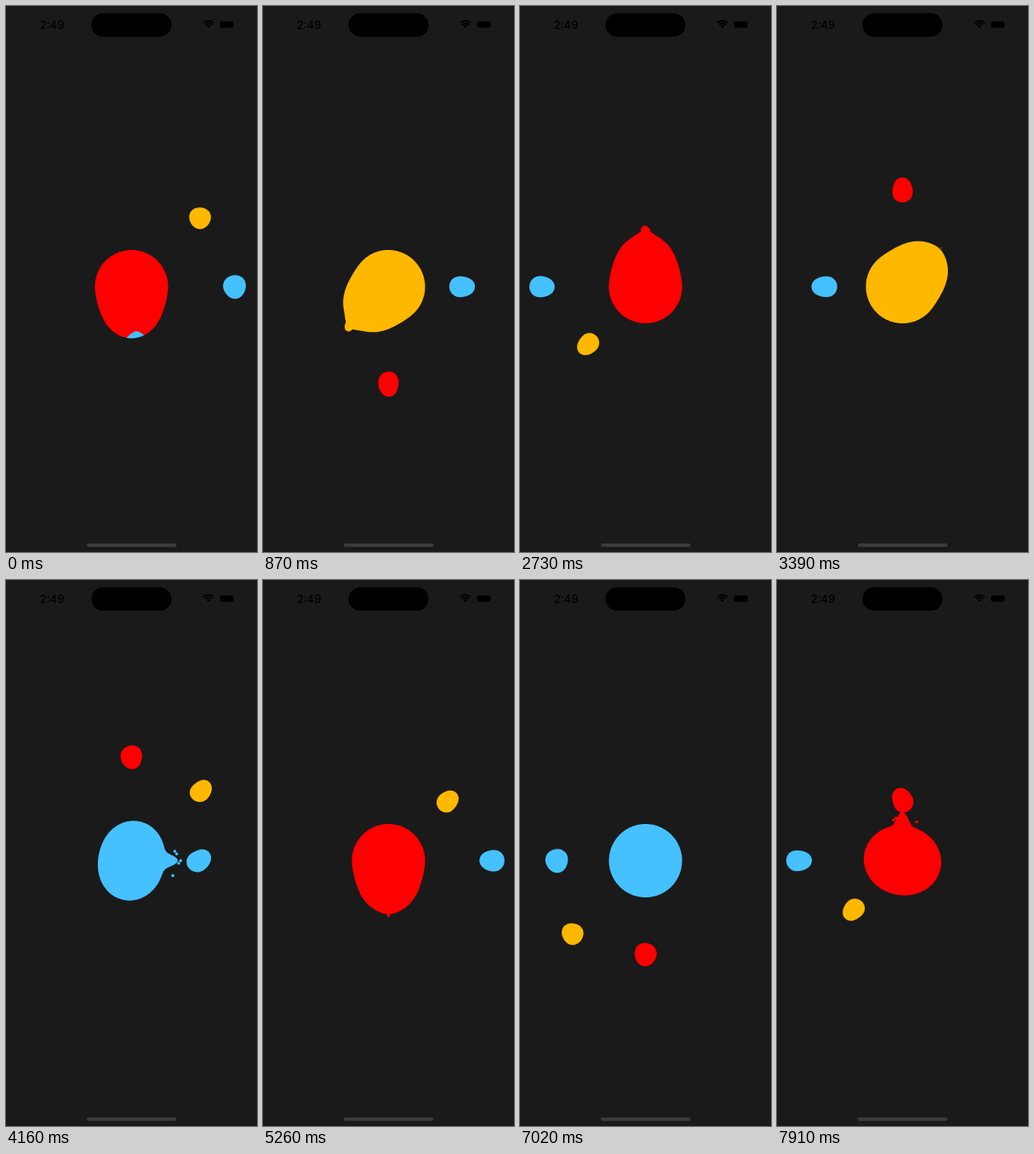
An HTML page with a canvas for the animation above (8 s loop, 295 px wide and 640 px high).

```html
<!DOCTYPE html>
<html lang="en">
<head>
<meta charset="utf-8">
<title>Liquid drops</title>
<style>
  html, body { margin: 0; width: 100%; height: 100%; overflow: hidden; background: #1a1a1a; }
  canvas { display: block; width: 295px; height: 640px; }
</style>
</head>
<body>
<canvas id="stage"></canvas>
<script>
const canvas = document.getElementById('stage');
const ctx = canvas.getContext('2d');
const dpr = window.devicePixelRatio || 1;
canvas.width = 295 * dpr;
canvas.height = 640 * dpr;

const { PI, sin, cos, exp, min } = Math;
const LOOP = 8000, HALF = 2550, CX = 147.5, CY = 329, RADIUS = 43;
const REACH = 122, TURN = 1210, FALL = 990;
const WIPE_START = -560, WIPE_END = -140;

// Each drop bursts out of the body at `start`, then again on the opposite side every HALF ms.
const drops = [
  { color: '#ff0000', start: 180, angle: PI / 2, size: 13.3 },
  { color: '#ffb800', start: 865, angle: PI * 3 / 4, size: 12.7 },
  { color: '#45c1ff', start: 1500, angle: PI, size: 13.6 }
];
const sprayOffsets = [17.5, -11, -8, 3, 0];

// Eased rise from 0 to 1 between a and b.
function rise(a, b, t) {
  const u = Math.max(0, min(1, (t - a) / (b - a)));
  return u * u * (3 - 2 * u);
}

const bell = (t, center, width, power = 2) => exp(-(Math.abs((t - center) / width) ** power));

// Shape rules; e is the time in ms since the drop burst out.
const bulge = e => 18.5 * rise(-350, -150, e) * (1 - rise(10, 90, e));
const cusp = e => 16 * rise(-40, 80, e) * (1 - rise(100, 170, e));
const squash = e => 4 * bell(e, 120, 60);
const dent = e => 9.5 * bell(e, -465, 40);
const growth = e => rise(-30, 0, e) * (.45 + .55 * rise(0, 80, e));
const stretch = e => .04 + .07 * cos((e - 100) * PI / 300);
const tilt = e => -.4 - (PI - .4) * rise(80, 280, e);

function distance(e) {
  if (e > TURN) return REACH * (1 - ((e - TURN) / FALL) ** 3.7);
  return 65 + 20 * rise(60, 170, e) + (REACH - 85) * sin(PI / 2 * e / TURN);
}

// Closed outline from a polar radius function.
function polar(radius, steps) {
  ctx.beginPath();
  for (let i = 0; i < steps; i++) {
    const a = i / steps * PI * 2, r = radius(a);
    ctx.lineTo(r * cos(a), r * sin(a));
  }
  ctx.closePath();
}

// Every drop gives two events: its last burst and the one coming up.
function eventsAt(t) {
  return drops.flatMap(drop => {
    const n = Math.floor((t - drop.start) / HALF);
    const e = t - drop.start - n * HALF;
    const angle = drop.angle + n * PI;
    return [{ drop, e, angle }, { drop, e: e - HALF, angle: angle + PI }];
  });
}

function drawDrop({ drop, e, angle }) {
  if (e < -30) return;
  const r = distance(e);
  const fade = e > TURN ? min(1, (r - 40) / 20) : 1;
  if (fade <= 0) return;
  const size = drop.size * growth(e) * fade;
  ctx.save();
  ctx.rotate(angle);
  ctx.translate(r, 0);
  ctx.rotate(tilt(e));
  ctx.fillStyle = drop.color;
  polar(a => size * (1 + stretch(e) * cos(2 * a) + .03 * cos(3 * a + e / 200)), 60);
  ctx.fill();
  ctx.restore();
}

function drawSpray({ drop, e, angle }) {
  if (e < 60 || e > 380) return;
  const drift = 5 * (1 - ((e - 180) / 90) ** 2);
  ctx.save();
  ctx.rotate(angle);
  ctx.fillStyle = drop.color;
  sprayOffsets.forEach((y, i) => {
    ctx.beginPath();
    ctx.arc(46.5 + 2.3 * i + drift, y * (1 + (e - 110) / 600), 1.8, 0, PI * 2);
    ctx.fill();
  });
  ctx.restore();
}

function bodyRadius(events, a) {
  let r = RADIUS;
  for (const { e, angle } of events) {
    if (e < -700 || e > 500) continue;
    const c = cos(a - angle);
    const off = Math.acos(c);
    r += bulge(e) * Math.max(0, c) ** 3;
    r += cusp(e) * bell(off, 0, .17);
    r += dent(e) * bell(off, PI, .28, 3);
    r -= squash(e) * cos(2 * (a - angle - .2));
  }
  return r;
}

// Fills the body on one side of the wavy colour front.
function fillSide(events, color, angle, front, side) {
  ctx.save();
  ctx.rotate(angle);
  ctx.beginPath();
  ctx.moveTo(side, -90);
  for (let y = -90; y <= 90; y += 2) ctx.lineTo(front - 6 * cos((y + 6) / 6.5), y);
  ctx.lineTo(side, 90);
  ctx.clip();
  ctx.rotate(-angle);
  polar(a => bodyRadius(events, a), 360);
  ctx.fillStyle = color;
  ctx.fill();
  ctx.restore();
}

function drawBody(events) {
  const base = events.filter(v => v.e >= WIPE_END).sort((a, b) => a.e - b.e)[0];
  const wipe = events.find(v => v.e >= WIPE_START && v.e < WIPE_END);
  if (wipe) {
    const front = -26 + .3 * (wipe.e + 460);
    fillSide(events, base.drop.color, wipe.angle, front - .5, 150);
    fillSide(events, wipe.drop.color, wipe.angle, front, -150);
  } else {
    polar(a => bodyRadius(events, a), 360);
    ctx.fillStyle = base.drop.color;
    ctx.fill();
  }
}

function pill(x, y, w, h, r, color) {
  ctx.fillStyle = color;
  ctx.beginPath();
  ctx.roundRect(x, y, w, h, r);
  ctx.fill();
}

function drawPhone() {
  ctx.fillStyle = '#1a1a1a';
  ctx.fillRect(0, 0, 295, 640);
  pill(100.5, 8.5, 94, 27.5, 13.75, '#000');
  pill(251.5, 18, 16, 7.5, 2.2, '#000');
  pill(95, 630, 105.5, 4, 2, '#3b3b3b');
  ctx.fillStyle = '#000';
  ctx.font = '500 13px Inter, sans-serif';
  ctx.textAlign = 'center';
  ctx.fillText('2:49', 54, 26.5);
  ctx.strokeStyle = '#000';
  ctx.lineWidth = 1.8;
  for (const r of [8.5, 5.5]) {
    ctx.beginPath();
    ctx.arc(238, 26, r, -PI * .75, -PI * .25);
    ctx.stroke();
  }
  ctx.beginPath();
  ctx.moveTo(238, 26);
  ctx.arc(238, 26, 3.2, -PI * .75, -PI * .25);
  ctx.fill();
}

function frame(now) {
  const events = eventsAt(now % LOOP);
  ctx.setTransform(dpr, 0, 0, dpr, 0, 0);
  drawPhone();
  ctx.translate(CX, CY);
  events.forEach(drawSpray);
  events.forEach(drawDrop);
  drawBody(events);
  requestAnimationFrame(frame);
}
requestAnimationFrame(frame);
</script>
</body>
</html>
```
